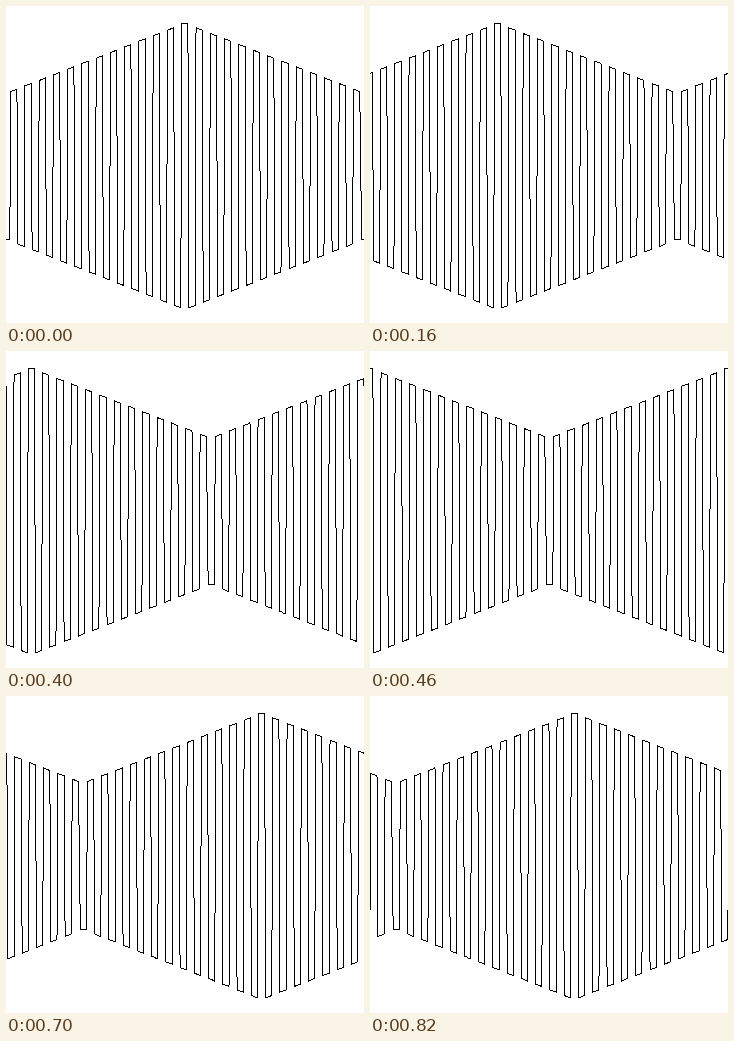
Animation of 358x317 px, one loop 0.88 s. Source, as an HTML page with a canvas:

```html
<!DOCTYPE html>
<html lang="en">
<head>
<meta charset="utf-8">
<title>Scrolling pleats</title>
<style>
  html, body { margin: 0; width: 100%; height: 100%; overflow: hidden; background: #fff; }
  canvas { display: block; }
</style>
</head>
<body>
<canvas id="stage" width="358" height="317"></canvas>
<script>
const W = 358, H = 317;
const TEETH = 25, PITCH = W / TEETH;
const HALF = 3.1;            // half width of a flat
const RISE = 5.58;           // height change from tooth to tooth
const SLANT = 1.2;           // half the height change along a flat
const SQUEEZE = 0.9;         // the rising side is this much narrower
const PEAK_X = 178.8, TOP_Y = 17.4, VALLEY_Y = 233.6;
const STEPS = 14, FIRST_MS = 100, STEP_MS = 60;
const LOOP_MS = FIRST_MS + (STEPS - 1) * STEP_MS;

const ctx = document.getElementById('stage').getContext('2d');

// Crisp one-pixel line without antialiasing, keeping subpixel ends
function line([ax, ay], [bx, by]) {
  const dx = bx - ax, dy = by - ay;
  const n = Math.ceil(Math.max(Math.abs(dx), Math.abs(dy)));
  for (let i = 0; i <= n; i++) {
    ctx.fillRect(Math.floor(ax + dx * i / n), Math.floor(ay + dy * i / n), 1, 1);
  }
}

// The two ends of a flat; half-integer positions lie on the lower edge
function flat(position, peakX) {
  const wrapped = position - TEETH * Math.round(position / TEETH);
  const distance = Math.abs(wrapped);
  const isTop = Number.isInteger(position);
  const y = isTop ? TOP_Y + RISE * distance
                  : VALLEY_Y + RISE * (TEETH / 2 - distance);
  const atTurn = distance === 0 || distance === TEETH / 2;
  const slope = atTurn ? 0 : SLANT * Math.sign(wrapped) * (isTop ? 1 : -1);
  const shift = SQUEEZE * Math.max(0, -wrapped) / (TEETH / 2);
  const x = peakX + position * PITCH + shift;
  return [[x - HALF, y - slope], [x + HALF, y + slope]];
}

function draw(step) {
  ctx.fillStyle = '#fff';
  ctx.fillRect(0, 0, W, H);
  ctx.fillStyle = '#000';
  const peakX = PEAK_X - step * W / STEPS;
  let last = null;
  for (let p = -TEETH; p <= 2 * TEETH; p += 0.5) {
    const [start, end] = flat(p, peakX);
    if (last) line(last, start);
    line(start, end);
    last = end;
  }
}

const begin = performance.now();
let shown = -1;
function tick() {
  const t = (performance.now() - begin) % LOOP_MS;
  const step = t < FIRST_MS ? 0 : 1 + Math.floor((t - FIRST_MS) / STEP_MS);
  if (step !== shown) draw(shown = step);
  requestAnimationFrame(tick);
}
tick();
</script>
</body>
</html>
```
